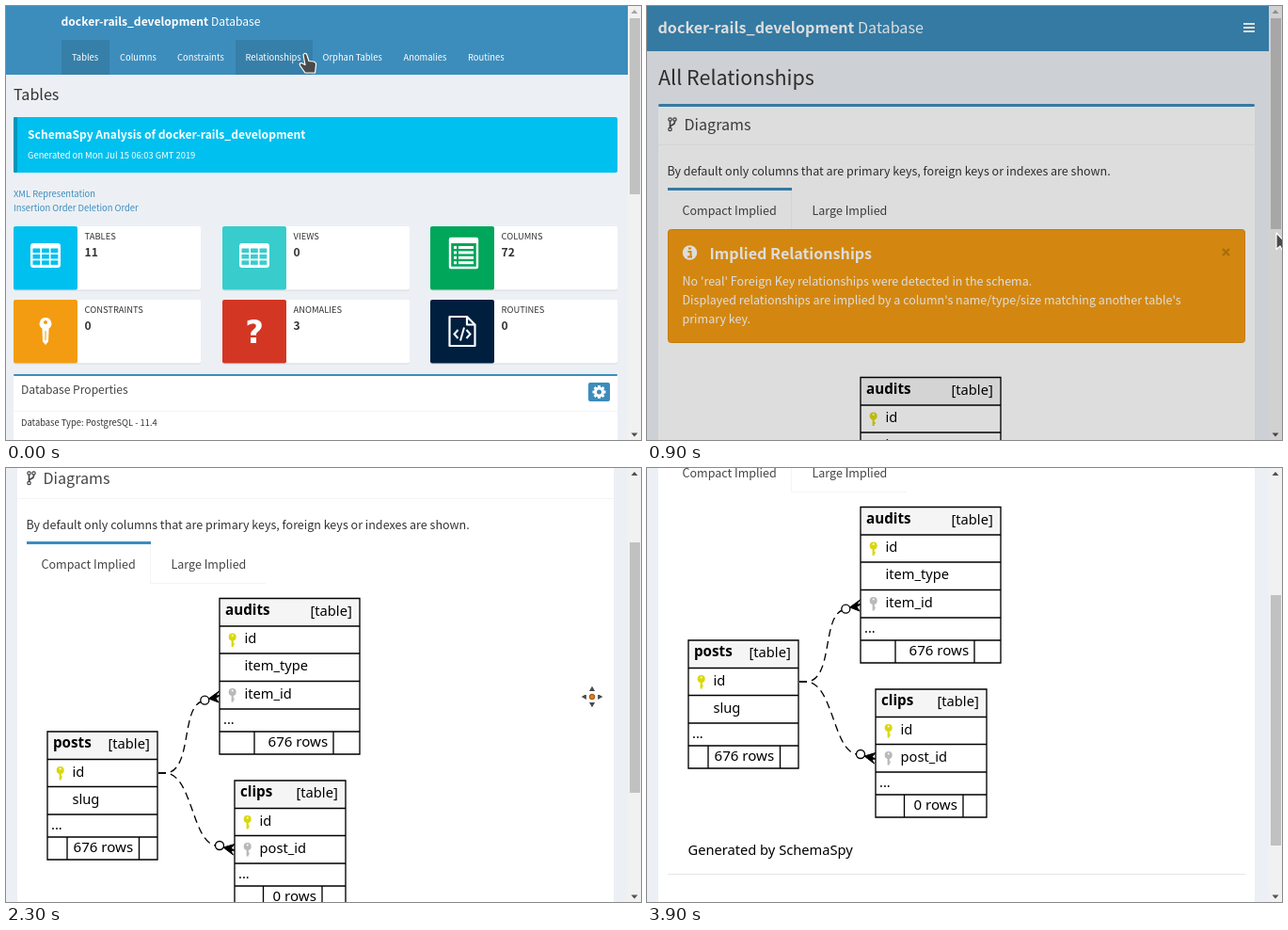
Write an HTML page that moves like this. It is 675 px wide and 461 px high and loops after 4000 ms.

```html
<!DOCTYPE html>
<html lang="en">
<head>
<meta charset="utf-8">
<title>Schema browser</title>
<style>
html, body { margin: 0; width: 675px; height: 461px; overflow: hidden; background: #ecf0f5; }
svg { display: block; }
text { white-space: pre; }
.ui { font-family: 'Noto Sans CJK JP', 'Noto Sans CJK SC', 'Noto Sans CJK KR', 'Noto Sans CJK', sans-serif; }
.dia { font-family: 'Noto Sans', 'Open Sans', sans-serif; }
</style>
</head>
<body>
<svg id="stage" width="675" height="461" viewBox="0 0 675 461"></svg>
<script>
const BLUE = '#3c8dbc', INK = '#333', WHITE = '#fff';
const UI_SCALE = 1.117; // CJK Latin glyphs are drawn larger on the em

const rect = (x, y, w, h, fill, more = '') =>
  `<rect x="${x}" y="${y}" width="${w}" height="${h}" fill="${fill}" ${more}/>`;
const path = (d, more) => `<path d="${d}" ${more}/>`;
const circle = (x, y, r, more) => `<circle cx="${x}" cy="${y}" r="${r}" ${more}/>`;
const group = (id, body, more = '') => `<g id="${id}" ${more}>${body}</g>`;
const ui = (x, y, s, size, fill = INK, weight = 400) =>
  `<text class="ui" x="${x}" y="${y}" font-size="${(size / UI_SCALE).toFixed(2)}" fill="${fill}" font-weight="${weight}">${s}</text>`;
const dia = (x, y, s, size = 14.67, more = '') =>
  `<text class="dia" x="${x}" y="${y}" font-size="${size}" ${more}>${s}</text>`;

// ---- overview page ----
const tableIcon = x => {
  let s = rect(x, 252, 32, 26, WHITE, 'rx="3"');
  return [0, 1, 2].reduce((out, r) => out + [0, 1, 2].map(c =>
    rect(x + 2.5 + c * 9.5, 257.5 + r * 6.4, 7.8, 4.6, 'currentColor')).join(''), s);
};
const listIcon = () => {
  let s = rect(472, 247, 29, 31, 'none', 'stroke="#fff" stroke-width="2.4" rx="1"') + rect(472, 246, 29, 6, WHITE);
  for (let i = 0; i < 4; i++)
    s += rect(476, 255 + i * 5.4, 3, 3, WHITE) + rect(481, 255 + i * 5.4, 16, 3, WHITE);
  return s;
};
const keyIcon = () =>
  path('M42 331a6.3 6.3 0 0 1 3.6 11.5L45 356.500 42 360 39 356.500 38.400 342.500A6.3 6.3 0 0 1 42 331Z', 'fill="#fff"') +
  circle(42, 336, 2, 'fill="#f39c12"') + path('M42 345V355', 'stroke="#f39c12" stroke-width="1"');
const codeIcon = () => path('M471.500 330H490L498.500 338.500V361H471.500ZM490 330V338.500H498.500',
  'fill="none" stroke="#fff" stroke-width="2.2" stroke-linejoin="round"') +
  path('M480.500 344L476.500 348.500 480.500 353M489.500 344L493.500 348.500 489.500 353M487 341.500L483 355.500',
  'fill="none" stroke="#fff" stroke-width="2"');
const markIcon = () =>
  '<text x="264" y="358" text-anchor="middle" font-size="34" font-weight="700" fill="#fff" font-family="DejaVu Sans, sans-serif">?</text>';

const infoBox = (x, y, color, label, value, icon) =>
  rect(x, y + 1, 199, 67.5, '#d6dade', 'rx="2"') + rect(x, y, 199, 67.5, WHITE, 'rx="2"') +
  rect(x, y, 68, 67.5, color, 'rx="2"') + `<g color="${color}">${icon}</g>` +
  ui(x + 75.5, y + 14, label, 10.5) + ui(x + 75.5, y + 32, value, 13.5, INK, 700);

const gear = (x, y) => {
  let s = circle(x, y, 4, 'fill="none" stroke="#fff" stroke-width="3"');
  for (let a = 0; a < 360; a += 45)
    s += rect(x - 1.4, y - 7, 2.8, 3, WHITE, `transform="rotate(${a} ${x} ${y})"`);
  return s;
};

const nav = [[70, 'Tables'], [121, 'Columns'], [182, 'Constraints'], [254.5, 'Relationships'],
  [336.5, 'Orphan Tables'], [422.5, 'Anomalies'], [491, 'Routines']];

const overview = rect(0, 0, 675, 461, '#ecf0f5') + rect(0, 0, 661, 73, BLUE) +
  ui(58.5, 21, 'docker-rails_development', 13.5, WHITE, 700) + ui(218, 21, 'Database', 13.5, WHITE) +
  rect(59, 36, 51, 37, '#367fa9') + rect(244, 36, 82, 37, '#367fa9') +
  nav.map(([x, s]) => ui(x, 58, s, 10.5, WHITE)).join('') +
  ui(8, 100, 'Tables', 18) +
  rect(8, 118, 642, 59, '#00c0ef', 'rx="2"') + rect(8, 118, 4, 59, '#0097bc', 'rx="1"') +
  ui(23, 141, 'SchemaSpy Analysis of docker-rails_development', 13.5, WHITE, 600) +
  ui(23, 162, 'Generated on Mon Jul 15 06:03 GMT 2019', 10.5, WHITE) +
  ui(8, 203, 'XML Representation', 10.5, BLUE) +
  ui(8, 218, 'Insertion Order Deletion Order', 10.5, BLUE) +
  infoBox(8, 234, '#00c0ef', 'TABLES', 11, tableIcon(26)) +
  infoBox(230, 234, '#39cccc', 'VIEWS', 0, tableIcon(248)) +
  infoBox(451, 234, '#00a65a', 'COLUMNS', 72, listIcon()) +
  infoBox(8, 312, '#f39c12', 'CONSTRAINTS', 0, keyIcon()) +
  infoBox(230, 312, '#d33724', 'ANOMALIES', 3, markIcon()) +
  infoBox(451, 312, '#001f3f', 'ROUTINES', 0, codeIcon()) +
  rect(8, 391, 642, 80, WHITE, 'rx="2"') + rect(8, 391, 642, 2, BLUE, 'rx="1"') +
  ui(16, 412, 'Database Properties', 13.5, '#444') +
  rect(619, 400, 23, 20, BLUE, 'rx="2"') + gear(630.5, 410) +
  rect(8, 430, 642, 1, '#f4f4f4') +
  ui(16, 446, 'Database Type: PostgreSQL - 11.4', 10.5);

// ---- diagram ----
const smallKey = (x, y, color) =>
  circle(x, y, 4, `fill="${color}"`) + circle(x, y - 1.6, 1, 'fill="#fff"') +
  path(`M${x} ${y + 3}V${y + 10.500}M${x} ${y + 7.500}H${x + 2}`, `stroke="${color}" stroke-width="2.2"`);

// lines: row boundaries from top to bottom; cells: dividers in the last row
const entity = (x, w, lines, cells, name, tagX, rows, count) => {
  const top = lines[0], end = lines[lines.length - 1], foot = lines[lines.length - 2];
  const rules = lines.slice(1, -1).map(y => `M${x} ${y}H${x + w}`).join('') +
    cells.map(c => `M${c} ${foot}V${end}`).join('');
  return rect(x, top, w, end - top, WHITE) + rect(x, top, w, lines[1] - top, '#f5f5f5') +
    path(`M${x} ${top}H${x + w}V${end}H${x}Z${rules}`, 'fill="none" stroke="#000" stroke-width="1.33"') +
    dia(x + 6, top + 17, name, 15.2, 'font-weight="700"') + dia(tagX, top + 18, '[table]') +
    rows.map(([s, key], i) => dia(x + 26.5, lines[i + 1] + 18, s) +
      (key ? smallKey(x + 13.7, lines[i + 1] + 11.5, key) : '')).join('') +
    dia(x + 4, foot - 8, '...') + dia(count[0], foot + 16, count[1], 15.1);
};

const GOLD = '#d9d80e', GREY = '#b9b9b9';
const crow = (x, y) =>
  path(`M${x} ${y}L${x + 11} ${y - 8}L${x + 7.500} ${y - 3}L${x + 12} ${y - 3.500}L${x + 7.500} ${y - .500}L${x + 10.500} ${y + 4}Z`,
    'stroke="#000" stroke-width="1"');
const ring = (x, y) => circle(x, y, 4.5, 'fill="#fff" stroke="#000" stroke-width="1.33"');
const dashed = 'fill="none" stroke="#000" stroke-width="1.33" stroke-dasharray="8 5"';

const diagram =
  path('M162 227H170C198 225 186 158 208 151', dashed) +
  path('M162 227H170C198 229 198 301 223 304', dashed) +
  ring(211.3, 149.7) + crow(215.500, 148) + ring(227, 304) +
  path('M231 306L243 302.500 239 307 243 309 239 309.500 241.500 314Z', 'stroke="#000"') +
  entity(227, 149, [41.5, 71, 100, 129.5, 159, 183, 207], [264, 348], 'audits', 323.5,
    [['id', GOLD], ['item_type'], ['item_id', GREY]], [278.5, '676 rows']) +
  entity(44, 117, [183, 212.5, 241.5, 271, 295, 319], [65, 141.5], 'posts', 108.5,
    [['id', GOLD], ['slug']], [71.5, '676 rows']) +
  entity(243, 118, [235, 264.5, 293.5, 323, 347, 371], [273.5, 336], 'clips', 308.5,
    [['id', GOLD], ['post_id', GREY]], [283.5, '0 rows']) +
  dia(43.5, 411, 'Generated by SchemaSpy') +
  rect(22, 431, 614, 1, '#e6e6e6');

// ---- relationships page ----
const fork = path('M24.500 121V131M29.500 121V123.500C29.500 127 24.500 125.500 24.500 129',
  'fill="none" stroke="#444" stroke-width="1.6"') +
  [[24.5, 120.5], [29.5, 120.5], [24.5, 131]].map(([x, y]) =>
    circle(x, y, 1.7, 'fill="#fff" stroke="#444" stroke-width="1.2"')).join('');

const alertBox = rect(22.5, 237.5, 613, 120, '#f39c12', 'rx="3" stroke="#e08e0b"') +
  circle(45.5, 262, 7.7, 'fill="#fff"') +
  path('M44 257.500H47M43.500 261H46.500V266.500M43 266.500H48', 'fill="none" stroke="#f39c12" stroke-width="2"') +
  ui(66.5, 269, 'Implied Relationships', 18, WHITE, 600) +
  path('M612 258L619 265M619 258L612 265', 'stroke="#c27d0e" stroke-width="2.4"') +
  ["No 'real' Foreign Key relationships were detected in the schema.",
    "Displayed relationships are implied by a column's name/type/size matching another table's",
    'primary key.'].map((s, i) => ui(37.5, 297 + i * 20, s, 14, WHITE)).join('');

const relations = rect(0, 0, 661, 1000, '#ecf0f5') + rect(0, 0, 661, 48, BLUE) +
  ui(11.5, 29, 'docker-rails_development', 18, WHITE, 700) + ui(224, 29, 'Database', 18, WHITE) +
  [18, 22, 26].map(y => rect(634, y, 12, 2, WHITE)).join('') +
  ui(12, 84, 'All Relationships', 24) +
  rect(12, 104, 634, 800, WHITE, 'rx="3"') + rect(12, 104, 634, 3, BLUE, 'rx="1.5"') +
  fork + ui(39.5, 132, 'Diagrams', 18, '#444') + rect(12, 147, 634, 1, '#f4f4f4') +
  ui(21.5, 180, 'By default only columns that are primary keys, foreign keys or indexes are shown.', 14) +
  rect(22, 193, 132, 3, BLUE) + rect(153, 196, 1, 41, '#f4f4f4') + rect(153, 237, 123, 1, '#f4f4f4') +
  ui(37.5, 222, 'Compact Implied', 14, '#444') + ui(175.5, 222, 'Large Implied', 14, '#444') +
  group('alert', alertBox) + group('diagram', diagram);

// ---- browser parts and pointers ----
const status = path('M0 441H217Q221 441 221 445V461H0Z', 'fill="#2a313b"') +
  dia(0, 457, '/home/.../relationships.html', 12.8, 'fill="#9a9fa6"');

const bar = rect(661, 0, 14, 461, '#f1f1f1') + rect(663, 13, 11, 100, '#c1c1c1', 'id="thumb"') +
  path('M664.500 8L668 4 671.500 8Z', 'id="up"') + path('M664.500 453.500L668 457.500 671.500 453.500Z', 'fill="#505050"');

const skin = 'fill="#4a4a4a" stroke="#fff" stroke-width="1.2" stroke-linejoin="round"';
const arrow = path('M0 0V17.500L4 14 7.500 20.500 10.500 19 7.200 12.800 11.500 12Z', skin);
const hand = path('M-2 1Q-1 -1.500 1.500 0L4 7.500 9 8Q12 9 11.500 12L10.500 20H0L-5 13Q-7 9.500 -4 9.500L0 11.500Z', skin);
const pan = [0, 90, 180, 270].map(a =>
  path('M0 -12.500L4 -5.500H-4Z', `${skin} transform="rotate(${a})"`)).join('') +
  circle(0, 0, 2.8, 'fill="#f57900" stroke="#8a5a2a"');

document.getElementById('stage').innerHTML =
  group('overview', overview) + group('relations', relations) + group('status', status) + bar +
  rect(0, 0, 675, 461, '#000', 'id="dim"') +
  group('hand', hand) + group('arrow', arrow) + group('pan', pan);

// ---- motion ----
const el = {};
for (const id of ['overview', 'relations', 'alert', 'diagram', 'status', 'thumb', 'up', 'dim', 'hand', 'arrow', 'pan'])
  el[id] = document.getElementById(id);

const LOOP = 4000, STEP = 100, OPEN = 200, CLOSE = 1600, PAN = 1900, PAN_END = 3100, GONE = 3900;

const scrollKeys = [[1900, 0], [2000, 7], [2300, 115], [2500, 185], [2600, 208], [2700, 212]];
const dimKeys = [[600, 0], [900, .135], [1300, 0]];
const xKeys = [[0, 318], [200, 317], [500, 317], [900, 669], [1000, 669], [1400, 614],
  [1700, 614], [1900, 623], [2500, 623], [2700, 628], [3100, 628], [3600, 127], [3800, 56]];
const yKeys = [[0, 51], [500, 51], [900, 241], [1000, 241], [1400, 259],
  [1700, 259], [1900, 243], [2500, 243], [2700, 238], [3100, 238], [3600, 17], [3800, -4]];

function at(keys, t) {
  const i = keys.findIndex(k => k[0] > t);
  if (i === 0) return keys[0][1];
  if (i < 0) return keys[keys.length - 1][1];
  const [t0, a] = keys[i - 1], [t1, b] = keys[i];
  return a + (b - a) * (t - t0) / (t1 - t0);
}
const show = (node, on) => node.setAttribute('display', on ? 'inline' : 'none');
const move = (node, x, y) => node.setAttribute('transform', `translate(${x} ${y})`);

function draw(time) {
  const t = Math.floor(time % LOOP / STEP) * STEP;
  const home = t < OPEN, closed = t >= CLOSE, panning = t >= PAN && t < PAN_END;
  const scroll = Math.round(at(scrollKeys, t));
  const height = home ? 1072 : closed ? 754 : 895;

  show(el.overview, home);
  show(el.relations, !home);
  show(el.alert, !closed);
  show(el.status, t >= 100 && t < 700);
  move(el.relations, 0, -scroll);
  move(el.diagram, 0, closed ? 212 : 353);

  el.thumb.setAttribute('y', Math.round(13 + 435 * scroll / height));
  el.thumb.setAttribute('height', Math.round(435 * 461 / height));
  el.up.setAttribute('fill', scroll ? '#505050' : '#a3a3a3');
  el.dim.setAttribute('opacity', at(dimKeys, t));

  const x = Math.round(at(xKeys, t)), y = Math.round(at(yKeys, t));
  for (const id of ['hand', 'arrow', 'pan']) move(el[id], x, y);
  show(el.hand, home);
  show(el.pan, panning);
  show(el.arrow, !home && !panning && t < GONE);
}

let start;
function tick(now) {
  if (start === undefined) start = now;
  draw(now - start);
  requestAnimationFrame(tick);
}
draw(0);
requestAnimationFrame(tick);
</script>
</body>
</html>
```
